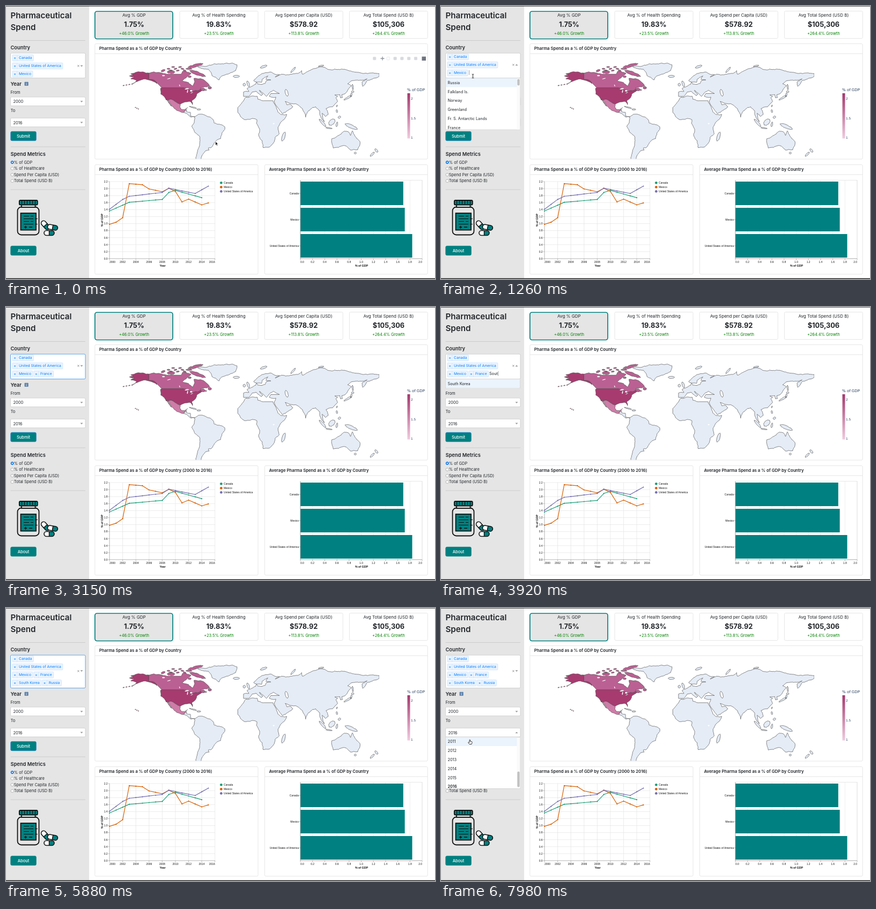
Recreate the animation shown at these times as an HTML page. Size 800 by 510 pixels, loop 8000 ms.

```html
<!DOCTYPE html>
<html lang="en">
<head>
<meta charset="utf-8">
<title>Pharmaceutical Spend</title>
<style>
html, body { margin: 0; width: 100%; height: 100%; overflow: hidden; background: #fff; }
svg { display: block; font-family: Inter, sans-serif; fill: #212529; }
#stage { width: 100%; height: 100%; }
.b { font-weight: 600; }
.m { text-anchor: middle; }
.e { text-anchor: end; }
.chart { font-family: "Liberation Sans", Arial, sans-serif; fill: #111; }
.plot { font-family: "DejaVu Sans", sans-serif; fill: #2a3f5f; }
</style>
</head>
<body>
<svg id="stage" viewBox="0 0 800 510"></svg>
<script>
const LOOP = 8000, TEAL = '#008080', BLUE = '#007eff';
const range = n => [...Array(n).keys()];
const text = (x, y, s, size, cls = '', more = '') =>
  `<text x="${x}" y="${y + size * .36}" font-size="${size}" class="${cls}" ${more}>${s}</text>`;
const rect = (x, y, w, h, fill, more = '') =>
  `<rect x="${x}" y="${y}" width="${w}" height="${h}" fill="${fill}" ${more}/>`;
const path = (d, stroke, width = 1, more = 'fill="none"') =>
  `<path d="${d}" stroke="${stroke}" stroke-width="${width}" ${more}/>`;
const circle = (x, y, r, fill, more = '') => `<circle cx="${x}" cy="${y}" r="${r}" fill="${fill}" ${more}/>`;
const group = (s, more) => `<g ${more}>${s}</g>`;

// World map: a few "lon,lat" corners per coast, joined by seeded fractal lines.
// Both sides of a shared border get the same line; borders along a parallel stay straight.
const noise = n => { const v = Math.sin(n * 127.1) * 43758.5; return v - Math.floor(v) - .5; };
function coast(a, b) {
  const len = Math.hypot(a[0] - b[0], a[1] - b[1]);
  if (len < 2 || a[0] === b[0] || a[1] === b[1]) return [a];
  const seed = a[0] * b[0] + a[1] * b[1];
  const mid = [0, 1].map(k => (a[k] + b[k]) / 2 + noise(seed + k) * len * .2);
  return [...coast(a, mid), ...coast(mid, b)];
}
const corners = s => s.trim().split(/\s+/).map(p => p.split(',').map(Number));
const outline = points => 'M' + points.flatMap((p, i) => coast(p, points[(i + 1) % points.length]))
  .map(([lon, lat]) => `${(455 + 1.339 * lon).toFixed(1)} ${(218.4 - 1.339 * lat).toFixed(1)}`).join('L') + 'Z';
const land = (...coasts) => coasts.map(s => outline(corners(s))).join('');

// Islands and lakes: "lon,lat,length,width,tilt"
function ellipse([lon, lat, a, b, tilt]) {
  const c = Math.cos(tilt * Math.PI / 180), s = Math.sin(tilt * Math.PI / 180);
  return outline(range(8).map(i => {
    const x = a * Math.cos(i * Math.PI / 4), y = b * Math.sin(i * Math.PI / 4);
    return [lon + x * c - y * s, lat + x * s + y * c];
  }));
}
const islands = s => corners(s).map(ellipse).join('');
const fill = (d, color, line = '#4a4a4a') => path(d, line, .65, `fill="${color}" stroke-linejoin="round"`);

const eurasia = `34,31 36,36 27,37 29,41 41,41 33,45.5 28,43 23,37 19,41 13,45.5 18,40 16,38 9,44 3,43 -1.5,37 -9,37
 -9,43 -1.5,44 -4,48 8,54 9,57 11,54 21,55 23,59 29,60 22,61 25,65.5 17,61 16,56.5 5,59 11,65 17,69 29,71 41,67 35,64
 44,68 67,69 ` + `72,73 73,68 87,75 104,77.5 113,74 140,72.5 180,69 180,65 163,59 157,51 156,57 163,61.5 142,59 136,54.5
 141,52 135,43.5 128,39.5 129,35.5 126,35 125,39.5 118,39 122,37 119.5,35 122,30 115,22.5 106,20 109,12 105,9 100.5,13.5
 103.5,1.5 98.5,9 97,17 91.5,22.5 87,21.5 80,15 77.5,8 73,20 67,25 57,27 49,30 51.5,25 56,26 59.8,22.5 45,13 39,21 34,29`;
const africa = `-6,35.8 10,37.3 11,33 20,31 32,31 35.5,24 39,15 43.2,11.5 51.2,11.8 47,4.5 39,-6 40.7,-15 35,-20 32,-29
 27,-33.7 18.3,-34.5 12,-17 13.5,-9 9,0 9.7,4.3 4,6.3 -7.5,4.4 -13,8.5 -17,14.7 -17,21.5 -10,29.5`;
const southAmerica = `-77,8.5 -72,12 -62,10.5 -51,4 -50,0 -35,-5.5 -35,-9 -39,-14 -41,-22 -48,-26 -54,-34.5 -58,-35 -57,-38
 -62,-39 -67,-46 -69,-52 -75,-52 -73,-38 -70.3,-18.5 -76,-14 -81,-5 -77.5,2`;
const centralAmerica = '-92.2,14.6 -88.2,18.3 -88.5,15.8 -83.3,15 -83,9.5 -77,8.5 -83,8.3 -88,13';
const greenland = '-43,60 -53,66 -54,70 -58,75 -68,76 -73,78.3 -50,82.5 -33,83.5 -18,81 -20,73 -32,68 -40,65';
const australia = '114,-22 122,-18 131,-11.5 136,-12 140,-17.5 142.5,-11 146,-18 153.2,-26 150,-37.5 140,-38 131,-31.5 116,-35';
const canada = `-123,49 -95,49 -89,48 -83,46 -82.5,42.5 -75,45 -71,45.2 -69,47.3 -67,45 -60,46 -65,49 -69,48.5 -60,50.2
 -56,52 -64,60 -78,62.3 -77,57.5 -79.5,51.5 -94.5,59 -87,65 -82,69.5 -94,71.8 -96,68 -115,68 -125,70 -141,69.6 -141,60.3
 -135,60 -130,56`;
const usa = `-124.6,48.3 -123,49 -95,49 -89,48 -83,46 -82.5,42.5 -75,45 -71,45.2 -69,47.3 -67,45 -74,40.5 -75.7,35.3 -81,31
 -80,25.5 -84,30 -97.2,26 -103,29 -106.5,31.7 -117,32.5 -124.3,40.3`;
const alaska = '-141,69.6 -156.5,71.3 -166,68.3 -162,66.5 -168,65.6 -161,64 -166,61.5 -158,59 -163,55 -150,60.5 -141,60 -130,55 -130,56 -135,60 -141,60.3';
const mexico = `-117,32.5 -106.5,31.7 -103,29 -97.2,26 -97.8,22 -95.5,18.5 -91,18.7 -87,21.5 -92.2,14.6 -105.5,20 -113,31
 -114.7,31.6 -109.5,23.2`;
const worldIslands = `-19,65,4.5,1.5,0 -2.5,54.5,4.3,1.6,110 -8,53.4,2,1.7,90 136,35,6,1.2,30 141,39,3,1,80 143,43.5,1.8,1.3,0
 143,50,4,.8,95 121,23.7,1.4,.6,70 121,16.5,2.2,1,100 124.5,8,2,1.5,30 101,0,7,1.5,-48 110,-7.2,4.5,.7,-8 114,1,5.5,3.5,45
 121,-2,3.5,1.2,80 141,-5,9.5,2.3,-22 46.7,-19,6.8,2,72 176,-38.5,3,1.5,-50 170.3,-43.7,4,1.3,45 146.6,-42,1.5,1.3,0
 -79.5,21.7,5.3,.6,-15 -71.3,18.8,2.8,.9,0 60,74,5,1.1,50 19,78.5,5,1.5,20 99,79.5,4,1,10`;
const canadaIslands = '-73,69,12,2.5,-20 -110,71,5.5,2.2,0 -121,73,3,1.4,20 -76,80,11,2,14 -85,75.5,4.5,.8,0 -56,49,2.5,1.8,0 -84,64.5,2.3,1.2,0';
const lakes = '-88,47.6,3,.8,10 -87,44,2.2,.7,80 -82,44.8,1.8,1,0 -81,42.2,2,.4,20 -98,52.3,1.5,.5,110 -113,61.8,2.8,.5,15 -120.5,66,2,.9,0 33,-1,1.2,1,0';

const card = (x, y, w, h, title) =>
  rect(x, y, w, h, '#fff', 'stroke="#e4e4e4" stroke-width=".9" rx="2"') +
  (title ? path(`M${x} ${y + 18.5}h${w}`, '#e2e2e2', .9) + text(x + 8, y + 9, title, 7.75, 'b') : '');

function summary() {
  const cards = [['Avg % GDP', '1.75%', '46.0'], ['Avg % of Health Spending', '19.83%', '23.5'],
    ['Avg Spend per Capita (USD)', '$578.92', '113.8'], ['Avg Total Spend (USD B)', '$105,306', '264.4']];
  return cards.map(([name, value, growth], i) => {
    const x = 165.8 + i * 158.2, mid = x + 73;
    return (i ? card(x, 9.5, 146, 51)
      : rect(165.8, 10, 145.2, 51.5, '#e5e5e5', `stroke="${TEAL}" stroke-width="1.7" rx="4"`)) +
      text(mid, 17, name, 8, 'm') + text(mid, 34, value, 12.8, 'm', 'font-weight="700"') +
      text(mid, 51.5, `+${growth}% Growth`, 7.5, 'm', 'style="fill:#008000"');
  }).join('');
}

function worldMap() {
  const arctic = range(8).map(i => ellipse([-91 - i * 3.2, 73 + i % 3 * 2.5, 2.3, .8, noise(i) * 30])).join('');
  const aleutians = range(4).map(i => ellipse([-164 - i * 4, 54.3 - i * .7, 1.2, .3, 15])).join('');
  const hawaii = range(3).map(i => ellipse([-155.5 - i * 2, 19.5 + i, .6, .4, 0])).join('');
  return card(165.8, 70.5, 620.4, 215.5, 'Pharma Spend as a % of GDP by Country') +
    `<svg width="696" height="285.5">` +
    fill(land(eurasia, africa, southAmerica, centralAmerica, greenland, australia) + islands(worldIslands), '#e5ecf6') +
    fill(land(canada) + islands(canadaIslands) + arctic, '#bb6093') + fill(land(usa, alaska) + aleutians + hawaii, '#a73b70') +
    fill(land(mexico), '#ce7ca8') + fill(islands(lakes), '#fff', 'none') + fill(islands('51,42,5,1.9,105'), '#fff') + '</svg>' +
    `<linearGradient id="scale" x2="0" y2="1"><stop stop-color="#a4376d"/><stop offset="1" stop-color="#f1cbdf"/></linearGradient>` +
    rect(748.5, 163, 5, 84.5, 'url(#scale)') +
    group(text(748, 156, '% of GDP', 7) + range(3).map(i => text(755, 173 + i * 36.5, 2 - i / 2, 5.8)).join(''), 'class="plot"');
}

// Tick label anchored inside the axis at both ends
const axisLabel = (x, s, i, last) => path(`M${x} 472v2.5`, '#888', .6) + text(x, 478, s, 4.95, i === last ? 'e' : i ? 'm' : '');

function lineChart() {
  const X = year => 193 + year * 12.29, Y = v => 472 - v * 65.45;
  // "year:value" at the bends; the years between lie on straight lines
  const series = [
    ['Canada', '#1b9e77', '0:1.36 3:1.61 8:1.69 9:1.89 10:1.95 14:1.74'],
    ['Mexico', '#d95f02', '0:.98 1:1.04 2:1.17 3:2.14 5:2.11 6:1.99 8:1.91 9:2.01 10:1.92 11:1.62 12:1.7 14:1.535 15:1.59'],
    ['United States of America', '#7570b3', '0:1.41 2:1.69 3:1.78 8:1.89 9:2.01 13:1.86 15:2.07']];
  let s = range(12).map(i => path(`M193 ${Y(i * .2)}H390`, '#e0e0e0', .6) + path(`M190.5 ${Y(i * .2)}h2.5`, '#888', .6) +
    text(189.5, Y(i * .2), (i * .2).toFixed(1), 4.95, 'e')).join('');
  s += range(9).map(i => path(`M${X(i * 2)} 328V472`, '#e0e0e0', .6) + axisLabel(X(i * 2), 2000 + i * 2, i, 8)).join('') +
    path('M193 328V472H390', '#999', .6);
  series.forEach(([name, color, data], k) => {
    const keys = data.split(' ').map(p => p.split(':').map(Number));
    const dots = keys.flatMap(([a, v], i) => {
      const [b, w] = keys[i + 1] || [a + 1, v];
      return range(b - a).map(j => [X(a + j), Y(v + (w - v) * j / (b - a))]);
    });
    s += path('M' + dots.join('L'), color, 1.2, 'fill="none" stroke-linejoin="round"') +
      dots.map(([x, y]) => circle(x, y, 1.1, color)).join('') +
      circle(401.3, 330.3 + k * 8, 2.4, color) + text(406, 330.5 + k * 8, name, 4.95);
  });
  s += text(292, 485.5, 'Year', 5.3, 'm', 'font-weight="700"') +
    text(0, 0, '% of GDP', 5.3, 'm', 'font-weight="700" transform="translate(179 400) rotate(-90)"');
  return card(165.8, 296.5, 304.2, 204.5, 'Pharma Spend as a % of GDP by Country (2000 to 2016)') + group(s, 'class="chart"');
}

function barChart() {
  const bars = [['Canada', 1.69], ['Mexico', 1.715], ['United States of America', 1.837]];
  let s = rect(549, 325.5, 227, 146.5, 'none', 'stroke="#ddd" stroke-width=".7"');
  s += range(11).map(i => path(`M${549 + i * 22.7} 325.5V472`, '#e4e4e4', .6) +
    axisLabel(549 + i * 22.7, (i * .2).toFixed(1), i, 10)).join('');
  bars.forEach(([name, value], i) => {
    const y = 328 + i * 49;
    s += rect(549, y, value * 113.5, 44, TEAL) + path(`M546.5 ${y + 22}h2.5`, '#888', .6) + text(546, y + 22, name, 4.95, 'e');
  });
  s += path('M549 325.5V472H776', '#888', .6) + text(663, 485.5, '% of GDP', 5.3, 'm', 'font-weight="700"');
  return card(482.5, 296.5, 303.7, 204.5, 'Average Pharma Spend as a % of GDP by Country') + group(s, 'class="chart"');
}

// Map tools, shown while the mouse is over the map
function toolbar() {
  const icons = range(7).map(i => rect(684.5 + i * 12.8, 95.3, 5.4, 5.4, i === 2 ? 'none' : '#d8dade', 'rx="1" stroke="#d8dade" stroke-width=".6"'));
  icons[1] = path('M702 94.5v7M698.5 98h7', '#8d929a', 1.3);
  return icons.join('') + rect(775.5, 94.5, 7.5, 7.5, '#6f7480');
}

// Sidebar
const OPTIONS = ['Russia', 'Falkland Is.', 'Norway', 'Greenland', 'Fr. S. Antarctic Lands', 'France', 'South Korea'];
const START = ['Canada', 'United States of America', 'Mexico'];
// Each pick types the start of a name, one key per interval, then takes the match
const PICKS = [
  { name: 'France', keys: 6, at: 1960, interval: 90, done: 2800 },
  { name: 'South Korea', keys: 4, at: 3640, interval: 90, done: 4130 },
  { name: 'Russia', keys: 3, at: 4760, interval: 100, done: 5180 }];
const COUNTRY_OPEN = 820, YEAR_OPEN = 6930;

function stateAt(t) {
  const names = [...START, ...PICKS.filter(p => t >= p.done).map(p => p.name)];
  let typed = '', lastKey = COUNTRY_OPEN;
  for (const p of PICKS) {
    if (t < p.at) break;
    const n = Math.min(p.keys, Math.floor((t - p.at) / p.interval) + 1);
    lastKey = p.at + (n - 1) * p.interval;
    typed = t < p.done ? p.name.slice(0, n) : '';
  }
  const touched = t >= COUNTRY_OPEN, focused = touched && t < YEAR_OPEN;
  return { names, typed, touched, focused, yearOpen: t >= YEAR_OPEN,
    open: focused && (typed !== '' || t < PICKS[0].done), caret: focused && (t - lastKey) % 1000 < 500 };
}

const pen = document.createElement('canvas').getContext('2d');
// Chips flow from left to right and wrap
function layoutChips(names) {
  let x = 12, row = 0;
  pen.font = '6.7px Inter, sans-serif';
  const chips = names.map(name => {
    const w = pen.measureText(name).width + 15;
    if (x > 12 && x + w > 130) { x = 12; row++; }
    const chip = { name, x, w, y: 95 + row * 15 };
    x += w + 2;
    return chip;
  });
  return { chips, endX: x, endY: 95 + row * 15 };
}

const arrow = (y, up) => `<path d="M138.5 ${y + (up ? 1.2 : -1.2)}h5l-2.5 ${up ? -2.6 : 2.6}z" fill="#999"/>`;
const field = (y, value, open) => rect(8.5, y, 139.5, 16.5, '#fff', 'stroke="#ccc" stroke-width=".8" rx="2"') +
  text(13.5, y + 8.5, value, 7.5) + arrow(y + 8.5, open);
const button = (y, label, border = TEAL) => rect(8.7, y + .3, 47.6, 17.4, TEAL, `rx="2.5" stroke="${border}" stroke-width=".7"`) +
  text(32.5, y + 9, label, 7.5, 'm', 'font-weight="500" style="fill:#fff"');
const rule = y => path(`M8.5 ${y}H148`, '#c4c4c4', .8);

function menu(y, h, items, hover, bold, thumbY, thumbH) {
  return `<svg x="8" y="${y}" width="140" height="${h}">` + rect(.4, .4, 139.2, h - .8, '#fff', 'stroke="#ccc" stroke-width=".8"') +
    items.map((s, i) => (i === hover ? rect(.8, i * 16.8 + .4, thumbH ? 133 : 138.4, 16.6, '#ebf3fc') : '') +
      text(4.5, i * 16.8 + 8.7, s, 7.3, s === bold ? 'b' : '')).join('') +
    (thumbH ? rect(133.5, .8, 6, h - 1.6, '#fafafa') + rect(134.3, thumbY, 4.3, thumbH, '#c1c1c1', 'rx="2"') : '') + '</svg>';
}

function pill(x, y, angle) {
  return group(rect(-9.5, -4.5, 19, 9, '#fff', 'rx="4.5"') + `<path d="M0-4.5H5a4.5 4.5 0 010 9H0z" fill="${TEAL}"/>` +
    rect(-9.5, -4.5, 19, 9, 'none', 'rx="4.5" stroke="#111" stroke-width="1.6"') + path('M0-4.5V4.5', '#111', 1.5),
    `transform="translate(${x} ${y}) rotate(${angle})"`);
}

function medicine() {
  const line = 'stroke="#111" stroke-width="1.8"';
  return rect(21.5, 375.5, 40, 52, '#e5e5e5', line + ' rx="7"') + rect(29, 371, 25.5, 5, '#e5e5e5', line) +
    rect(24.8, 363, 34, 8.5, TEAL, line + ' rx="2"') + path(range(6).map(i => `M${29.5 + i * 5} 364v6`).join(''), '#111', 1.2) +
    rect(27.5, 387, 28.5, 31.5, TEAL, line) + path(range(4).map(i => `M33 ${392.5 + i * 5}h${i % 2 ? 18 : 10}m3 0h5`).join(''), '#111', 1.2) +
    path('M36.5 410.8v5M34 413.3h5M43 413.3h6', '#111', 1.5) + pill(73.5, 409.5, 48) + pill(87, 413.5, 10) + pill(80.5, 424, 0);
}

function sidebar(t) {
  const { names, typed, touched, focused, open, caret, yearOpen } = stateAt(t);
  const { chips, endX, endY } = layoutChips(names);
  const shift = endY - 125, bottom = 134.5 + shift, dy = touched ? 0 : 2, active = focused && !open;
  const metrics = ['% of GDP', '% of Healthcare', 'Spend Per Capita (USD)', 'Total Spend (USD B)'];
  let s = rect(0, 0, 155, 510, '#e5e5e5') + text(8.5, 17.5, 'Pharmaceutical', 15.1, 'b') + text(8.5, 40, 'Spend', 15.1, 'b') +
    rule(64.5) + text(8.5, 78, 'Country', 9.3, 'b') +
    rect(8.5, 88, 139.5, bottom - 88, '#fff', `stroke="${active ? '#4f9be8' : '#ccc'}" stroke-width=".9" rx="2"`);
  s += group(chips.map(({ name, x, y, w }) =>
    rect(x, y - 5.7, w, 11.4, '#ebf4fe', 'stroke="#c2e0ff" stroke-width=".7" rx="1"') + path(`M${x + 8.7} ${y - 5.5}v11`, '#c2e0ff', .6) +
    text(x + 4.5, y - .6, '×', 7, 'm') + text(x + 12, y, name, 6.7)).join(''), `style="fill:${BLUE}" transform="translate(0 ${dy})"`);
  s += text(endX - .5, endY - .3, typed + (caret ? '<tspan font-weight="300">|</tspan>' : ''), 7.3);
  const mid = 110 + dy + shift / 2;
  s += text(135, mid - .6, '×', 8, 'm', 'style="fill:#888"') + arrow(mid, open);
  const rest = text(8.5, 145.3, 'Year', 9.3, 'b') + rect(34.5, 141.8, 7.2, 7.2, '#5e83ac', 'rx="1"') +
    text(38.1, 145.5, 'i', 6, 'm b', 'style="fill:#fff"') + text(8.5, 161, 'From', 7.6) + field(170, 2000) +
    text(8.5, 195.5, 'To', 7.6) + field(209.3, 2016, yearOpen) + button(234, 'Submit', '#2680d9') + rule(263) +
    text(8.5, 277, 'Spend Metrics', 9.3, 'b') +
    metrics.map((m, i) => {
      const y = 292 + i * 11.6;
      return circle(11.7, y, 2.7, i ? '#fff' : '#0b76ee', `stroke="${i ? '#888' : '#0b76ee'}" stroke-width=".6"`) +
        (i ? '' : circle(11.7, y, 1.2, '#fff')) + text(14.8, y, m, 7.45);
    }).join('') + rule(343) + medicine() + button(448, 'About');
  s += group(rest, `transform="translate(0 ${shift})"`);
  if (open) {
    const found = OPTIONS.filter(o => o.toLowerCase().includes(typed.toLowerCase()));
    s += menu(bottom, typed ? found.length * 16.8 + .8 : 97, found, 0, '', 2, typed ? 0 : 12);
  }
  if (yearOpen) s += menu(241, 97, range(6).map(i => 2011 + i), t < 7210 ? 5 : 0, 2016, 64.5, 29);
  return s;
}

// Mouse: [start, end, x, y] of each glide
const GLIDES = [[70, 770, 59.5, 131], [6230, 6860, 54, 233], [7140, 7910, 54, 249]];
function mouseAt(t) {
  let x = 390.5, y = 253;
  for (const [start, end, toX, toY] of GLIDES) {
    const p = Math.min(1, Math.max(0, (t - start) / (end - start))), k = p * p * (3 - 2 * p);
    x += (toX - x) * k;
    y += (toY - y) * k;
  }
  return [x, y];
}
function pointer(t, x, y) {
  if (t > PICKS[0].at && t < GLIDES[1][0]) return '';
  let shape = path('M0 0V7.2L1.7 5.7L2.8 8.2L4 7.7L2.9 5.2H5.1z', '#fff', .6, 'fill="#111"');
  if (x < 148 && y < 150) shape = path('M-1.7-3.7Q0-3.7 0-2.7Q0-3.7 1.7-3.7M0-2.8V2.8M-1.7 3.7Q0 3.7 0 2.7Q0 3.7 1.7 3.7', '#111', .9);
  else if (x < 148 && y > 241) shape = path('M-1-2.5Q0-3.5 .5-2.5V0L3.5 .6Q4.3 1 4 2.5L3 5.5H-1L-3.5 2.3Q-3 1-1 2.3z', '#111', .8, 'fill="#fff"');
  return group(shape, `transform="translate(${x} ${y})"`);
}

const stage = document.getElementById('stage');
stage.innerHTML = rect(0, 0, 800, 510, '#fff') + summary() + worldMap() + lineChart() + barChart() +
  `<g id="tools">${toolbar()}</g><g id="side"></g>` + rect(0, 0, 800, .8, '#333') + rect(0, 508.6, 800, 1.4, '#222') + '<g id="mouse"></g>';
const [tools, side, mouse] = ['tools', 'side', 'mouse'].map(id => document.getElementById(id));
let shown = '';
function draw() {
  const t = performance.now() % LOOP, [x, y] = mouseAt(t), html = sidebar(t);
  if (html !== shown) side.innerHTML = shown = html;
  mouse.innerHTML = pointer(t, x, y);
  tools.style.opacity = x > 166 ? 1 : 0;
  requestAnimationFrame(draw);
}
draw();
</script>
</body>
</html>
```
